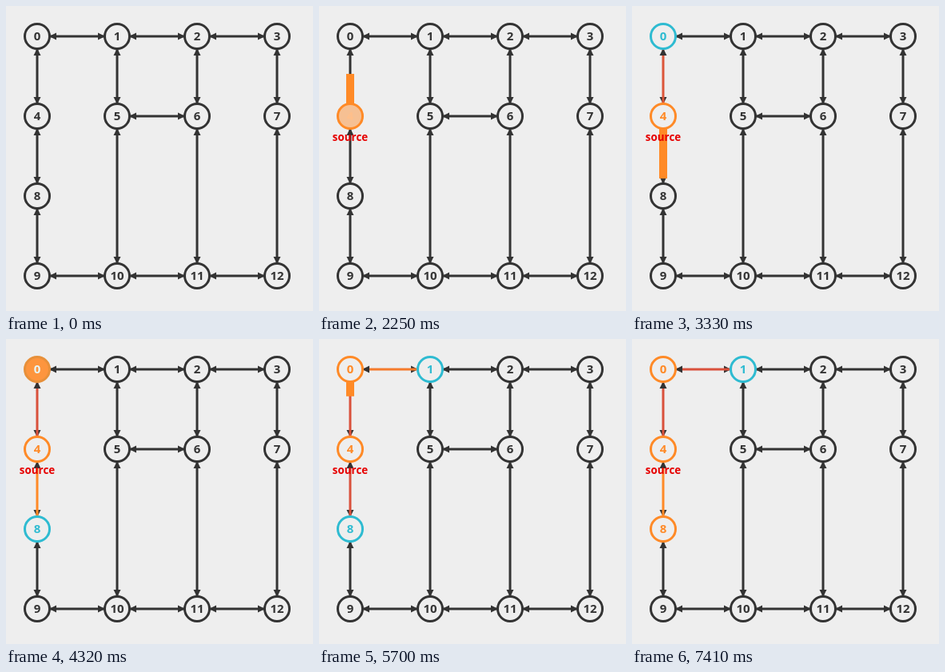
Animation of 384x382 px, one loop 8 s. Source, as an HTML page with a canvas:

```html
<!DOCTYPE html>
<html lang="en">
<head>
<meta charset="utf-8">
<title>Graph traversal</title>
<style>
  html, body { margin: 0; width: 100%; height: 100%; overflow: hidden; background: #eee; }
  canvas { display: block; width: 384px; height: 382px; }
</style>
</head>
<body>
<canvas id="stage"></canvas>
<script>
const WIDTH = 384, HEIGHT = 382, LOOP = 8000, FADE = 400;
const PAPER = [238, 238, 238], DARK = [51, 51, 51], WHITE = [255, 255, 255];
const BLUE = [46, 187, 209], ORANGE = [255, 138, 39], RED = [217, 81, 60];

const cells = [[0, 0], [1, 0], [2, 0], [3, 0], [0, 1], [1, 1], [2, 1], [3, 1],
               [0, 2], [0, 3], [1, 3], [2, 3], [3, 3]];
const nodes = cells.map(([col, row]) => ({ x: 39 + 100 * col, y: 38 + 100 * row }));

// The lower index comes first in every pair.
const edges = [[0, 1], [1, 2], [2, 3], [0, 4], [1, 5], [2, 6], [3, 7], [5, 6],
               [4, 8], [8, 9], [5, 10], [6, 11], [7, 12], [9, 10], [10, 11], [11, 12]];

const styles = {
  plain:   { ring: DARK,   fill: PAPER,  text: DARK },
  queued:  { ring: BLUE,   fill: PAPER,  text: BLUE },
  current: { ring: ORANGE, fill: ORANGE, text: WHITE },
  visited: { ring: ORANGE, fill: PAPER,  text: ORANGE }
};
const nodeChanges = [
  { node: 4, start: 1065, style: 'current' },
  { node: 4, start: 2045, style: 'visited' },
  { node: 0, start: 2560, style: 'queued' },
  { node: 8, start: 3575, style: 'queued' },
  { node: 0, start: 4043, style: 'current' },
  { node: 0, start: 4541, style: 'visited' },
  { node: 1, start: 5050, style: 'queued' },
  { node: 8, start: 6503, style: 'current' },
  { node: 8, start: 7000, style: 'visited' }
];
const sweeps = [
  { from: 4, to: 0, start: 2045, end: 2480 },
  { from: 4, to: 8, start: 3043, end: 3470 },
  { from: 0, to: 1, start: 4541, end: 4945 },
  { from: 0, to: 4, start: 5540, end: 5935 },
  { from: 8, to: 4, start: 7000, end: 7400 }
];
const LABEL_START = 1070;

const canvas = document.getElementById('stage');
const ctx = canvas.getContext('2d');
const ratio = window.devicePixelRatio || 1;
canvas.width = WIDTH * ratio;
canvas.height = HEIGHT * ratio;
ctx.scale(ratio, ratio);
ctx.textAlign = 'center';

const rgb = color => `rgb(${color.map(Math.round).join()})`;
const mix = (a, b, k) => a.map((v, i) => v + (b[i] - v) * k);

// Cubic ease in and out, from 0 at start to 1 after the fade time.
function progress(time, start) {
  const p = Math.min(1, Math.max(0, (time - start) / FADE));
  return p < 0.5 ? 4 * p ** 3 : 1 - 4 * (1 - p) ** 3;
}

// Runs draw with the origin at node a and the x axis pointing to node b.
function along(a, b, draw) {
  const dx = nodes[b].x - nodes[a].x, dy = nodes[b].y - nodes[a].y;
  ctx.save();
  ctx.translate(nodes[a].x, nodes[a].y);
  ctx.rotate(Math.atan2(dy, dx));
  draw(Math.hypot(dx, dy));
  ctx.restore();
}

function arrow(tip, base) {
  ctx.fillStyle = rgb(DARK);
  ctx.beginPath();
  ctx.moveTo(tip, 0);
  ctx.lineTo(base, -4.5);
  ctx.lineTo(base, 4.5);
  ctx.fill();
}

function bar(start, end, width, color) {
  ctx.fillStyle = rgb(color);
  ctx.fillRect(start, -width / 2, end - start, width);
}

function edgeColor(a, b, time) {
  let color = DARK;
  sweeps.forEach((sweep, i) => {
    const sameEdge = Math.min(sweep.from, sweep.to) === a && Math.max(sweep.from, sweep.to) === b;
    if (!sameEdge || time < sweep.end) return;
    const next = sweeps[i + 1];
    color = next ? mix(ORANGE, RED, progress(time, next.start)) : ORANGE;
  });
  return color;
}

function drawEdge([a, b], time) {
  along(a, b, length => {
    arrow(length - 15, length - 24);
    bar(16, length - 16, 3, edgeColor(a, b, time));
    arrow(15, 24);
  });
}

function drawSweep({ from, to, start, end }, time) {
  if (time < start || time >= end) return;
  along(from, to, length => {
    bar(16, 16 + (length - 32) * progress(time, start), 10, ORANGE);
  });
}

function nodeStyle(index, time) {
  let look = styles.plain;
  for (const { node, start, style } of nodeChanges) {
    if (node !== index || time < start) continue;
    const k = progress(time, start), goal = styles[style];
    look = {
      ring: mix(look.ring, goal.ring, k),
      fill: mix(look.fill, goal.fill, k),
      text: mix(look.text, goal.text, k)
    };
  }
  return look;
}

function drawNode({ x, y }, index, time) {
  const look = nodeStyle(index, time);
  ctx.beginPath();
  ctx.arc(x, y, 15.5, 0, 2 * Math.PI);
  ctx.fillStyle = rgb(look.fill);
  ctx.fill();
  ctx.lineWidth = 3;
  ctx.strokeStyle = rgb(look.ring);
  ctx.stroke();
  ctx.font = '700 15px "Open Sans", sans-serif';
  ctx.fillStyle = rgb(look.text);
  ctx.fillText(index, x, y + 5);
}

function draw(time) {
  ctx.fillStyle = rgb(PAPER);
  ctx.fillRect(0, 0, WIDTH, HEIGHT);
  edges.forEach(edge => drawEdge(edge, time));
  sweeps.forEach(sweep => drawSweep(sweep, time));
  nodes.forEach((node, index) => drawNode(node, index, time));
  if (time >= LABEL_START) {
    ctx.font = '700 13.4px "Open Sans", sans-serif';
    ctx.fillStyle = '#e60000';
    ctx.fillText('source', nodes[4].x, nodes[4].y + 30.5);
  }
}

const origin = performance.now();
function tick() {
  draw((performance.now() - origin) % LOOP);
  requestAnimationFrame(tick);
}
tick();
</script>
</body>
</html>
```
